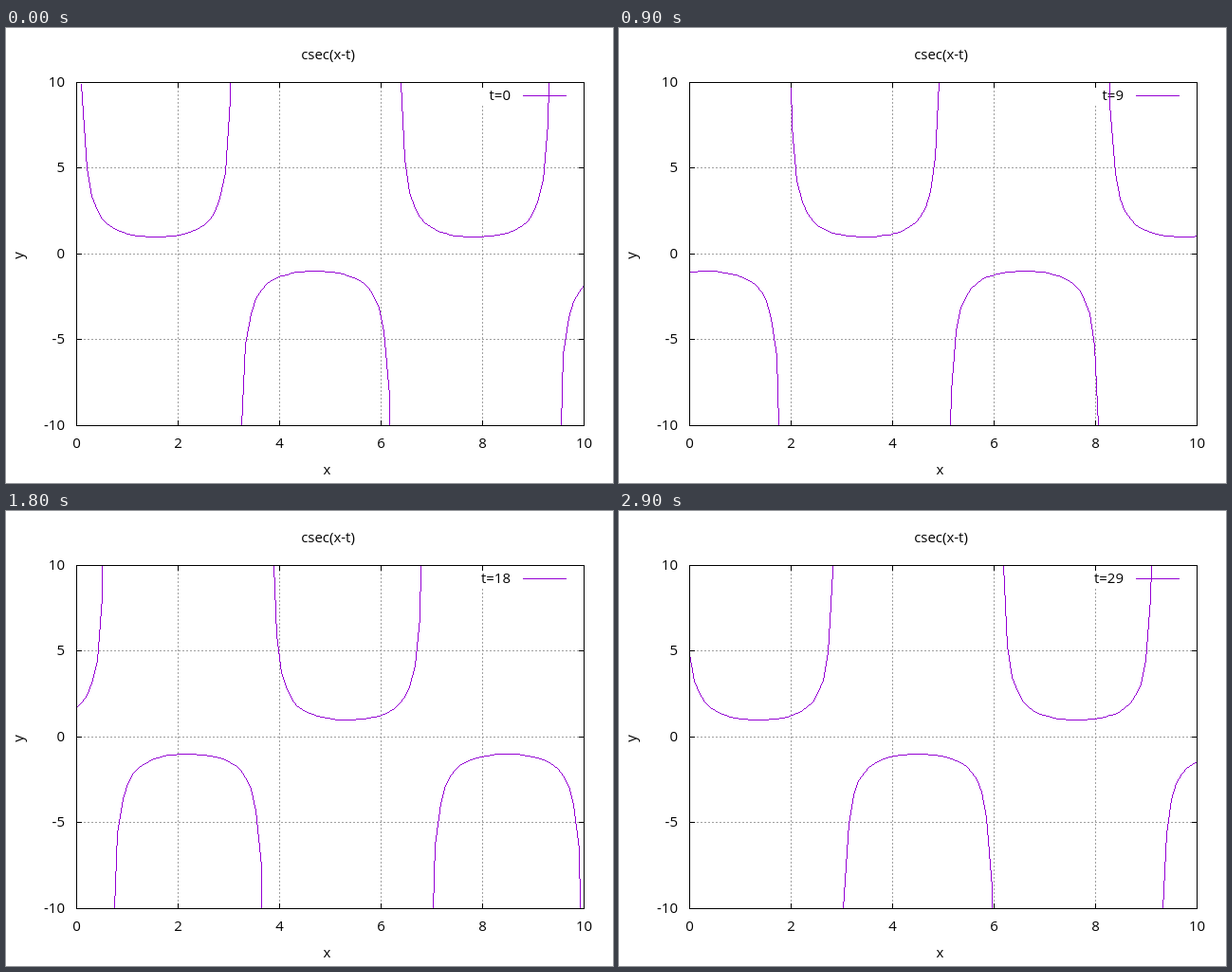
Write an HTML page with a canvas that moves like this. It is 640x480 px and loops after 3000 ms.

```html
<!DOCTYPE html>
<html lang="en">
<head>
<meta charset="utf-8">
<title>csec(x-t)</title>
<style>
html, body { margin: 0; width: 640px; height: 480px; overflow: hidden; background: #fff; }
canvas { display: block; }
</style>
</head>
<body>
<canvas id="stage" width="640" height="480"></canvas>
<script>
const ctx = document.getElementById('stage').getContext('2d');
const LEFT = 74, RIGHT = 609, TOP = 57, BOTTOM = 419;
const STEPS = 30, STEP_MS = 100, SAMPLES = 100;
const PURPLE = '#9400d3', GRID = '#a0a0a0';
const X_TICKS = [0, 2, 4, 6, 8, 10], Y_TICKS = [-10, -5, 0, 5, 10];

const mapX = x => Math.floor(LEFT + x * (RIGHT - LEFT) / 10 + 0.5);
const mapY = y => BOTTOM - Math.floor((y + 10) * (BOTTOM - TOP) / 20 + 0.5);
const inRange = y => Math.abs(y) <= 10;

function rect(color, x, y, w, h) {
  ctx.fillStyle = color;
  ctx.fillRect(x, y, w, h);
}

function text(s, x, y, align) {
  ctx.fillStyle = '#000';
  ctx.textAlign = align;
  ctx.fillText(s, x, y);
}

// Aliased one-pixel line
function line(x0, y0, x1, y1) {
  const dx = x1 - x0, dy = y1 - y0;
  const n = Math.max(Math.abs(dx), Math.abs(dy), 1);
  for (let i = 0; i <= n; i++) {
    rect(PURPLE, Math.round(x0 + dx * i / n), Math.round(y0 + dy * i / n), 1, 1);
  }
}

function drawGrid() {
  for (const v of X_TICKS.slice(1, -1)) {
    const end = v === 8 ? 81 : TOP;
    for (let y = BOTTOM; y > end; y -= 4) rect(GRID, mapX(v), y - 1, 1, 2);
  }
  for (const v of Y_TICKS.slice(1, -1)) {
    for (let x = LEFT; x < RIGHT; x += 4) rect(GRID, x, mapY(v), 2, 1);
  }
}

function drawCurve(shift) {
  let prev = null;
  for (let i = 0; i < SAMPLES; i++) {
    const x = 10 * i / (SAMPLES - 1);
    const s = Math.sin(x - shift);
    const cur = s === 0 ? null : { x, y: 1 / s };
    if (prev && cur && (inRange(prev.y) || inRange(cur.y))) {
      const a = clip(prev, cur), b = clip(cur, prev);
      line(mapX(a.x), mapY(a.y), mapX(b.x), mapY(b.y));
    }
    prev = cur;
  }
}

// Moves an outside point along its segment to the plot edge
function clip(p, other) {
  if (inRange(p.y)) return p;
  const y = 10 * Math.sign(p.y);
  return { x: other.x + (p.x - other.x) * (y - other.y) / (p.y - other.y), y };
}

function drawAxes() {
  const w = RIGHT - LEFT + 1, h = BOTTOM - TOP + 1;
  for (const y of [TOP, BOTTOM]) rect('#000', LEFT, y, w, 1);
  for (const x of [LEFT, RIGHT]) rect('#000', x, TOP, 1, h);
  for (const v of X_TICKS) {
    const x = mapX(v);
    rect('#000', x, TOP, 1, 6);
    rect('#000', x, BOTTOM - 5, 1, 6);
    text(v, x + 0.5, 443, 'center');
  }
  for (const v of Y_TICKS) {
    const y = mapY(v);
    rect('#000', LEFT, y, 6, 1);
    rect('#000', RIGHT - 5, y, 6, 1);
    text(v, 62, y + 5, 'right');
  }
  text('csec(x-t)', 339.5, 33, 'center');
  text('x', 338.5, 471, 'center');
  ctx.save();
  ctx.translate(18, 240);
  ctx.rotate(-Math.PI / 2);
  text('y', 0, 0, 'center');
  ctx.restore();
}

function draw(step) {
  rect('#fff', 0, 0, 640, 480);
  ctx.font = '15px "Open Sans", sans-serif';
  drawGrid();
  text('t=' + step, 532, 76, 'right');
  line(545, 71, 590, 71);
  drawCurve(2 * Math.PI * step / STEPS);
  drawAxes();
}

const start = performance.now();
function tick() {
  draw(Math.floor((performance.now() - start) / STEP_MS) % STEPS);
  requestAnimationFrame(tick);
}
tick();
</script>
</body>
</html>
```
